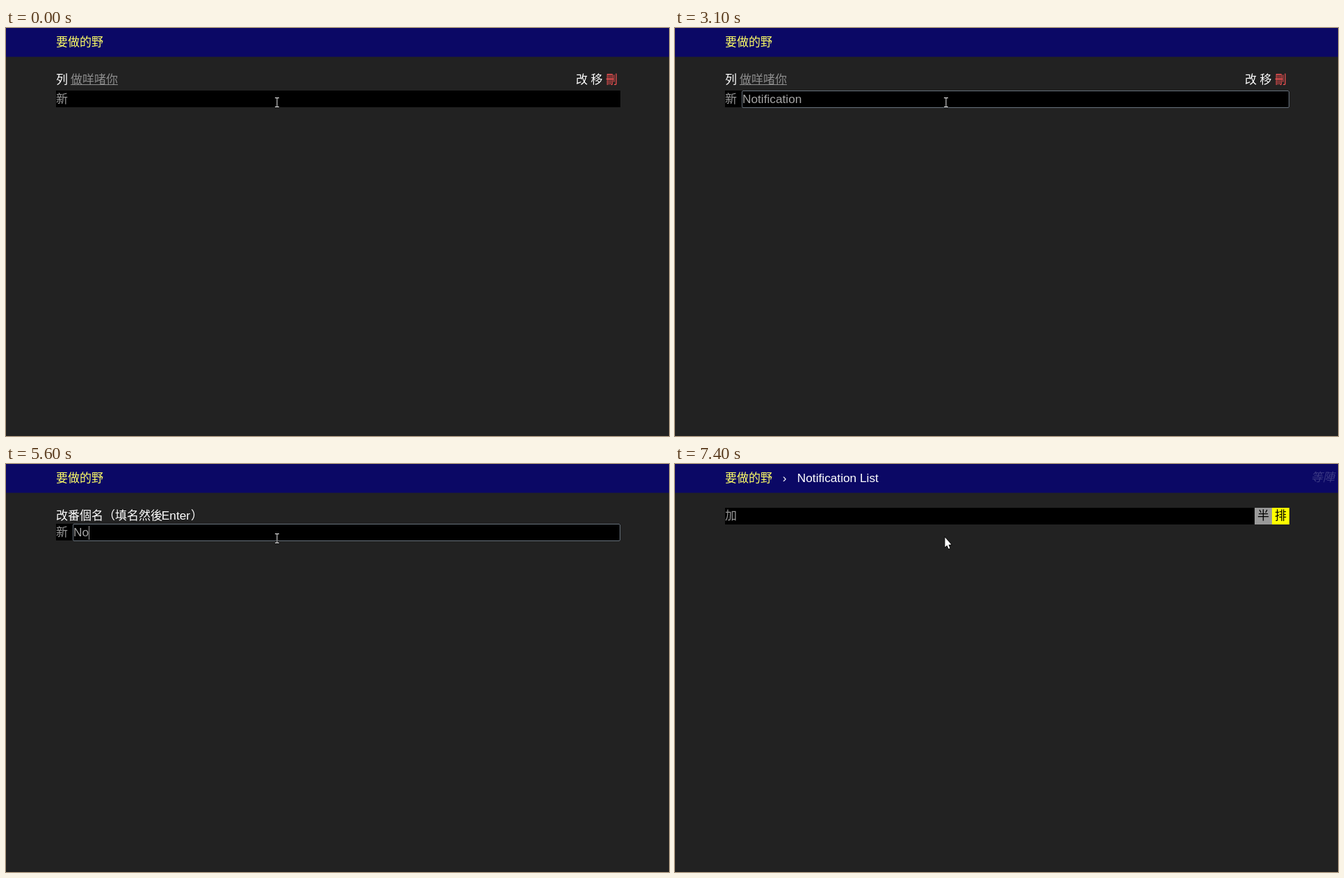
An HTML page with a canvas that plays this animation: 954x587 px, repeating every 8 s.

```html
<!DOCTYPE html>
<html lang="zh">
<head>
<meta charset="utf-8">
<title>要做的野</title>
<style>
  html, body { margin: 0; width: 100%; height: 100%; overflow: hidden; background: #222; }
  canvas { display: block; }
</style>
</head>
<body>
<canvas id="stage" width="954" height="587"></canvas>
<script>
const ctx = document.getElementById('stage').getContext('2d', { alpha: false });
const LOOP = 8000, RENAME_AT = 3300, LIST_AT = 7400;
const HAN = '17px "Noto Sans CJK SC", "Noto Sans CJK", sans-serif';
const LATIN = '17.28px "Liberation Sans", Arial, sans-serif';
const GREY = '#999', WHITE = '#fff', YELLOW = '#ffff66';
const WORD = 'Notification List';
const LEFT = 72, ROW = 80;

function rect(x, y, w, h, color) {
  ctx.fillStyle = color;
  ctx.fillRect(x, y, w, h);
}

function text(str, x, y, color, font = HAN) {
  ctx.font = font;
  ctx.fillStyle = color;
  ctx.fillText(str, x, y);
}

// Letters come in pairs every 200 ms; each third pair lags by 100 ms.
function pairsTyped(elapsed) {
  const beat = n => 200 * n + (n % 3 === 1 ? 100 : 0);
  let n = 0;
  while (beat(n + 1) <= elapsed) n++;
  return n;
}

function itemLetters(t) {
  if (t < 1000) return 0;
  return t < 3100 ? Math.min(11, 1 + 2 * pairsTyped(t - 1300)) : 12;
}

function renameLetters(t) {
  return t < 5600 ? 0 : Math.min(16, 2 + 2 * pairsTyped(t - 5600));
}

function newRow(top) {
  rect(LEFT, top, 812, 24, '#000');
  text('新', LEFT, top + 18, GREY);
}

function field(top, count, caretTop, showCaret) {
  const typed = WORD.slice(0, count), x = 97;
  ctx.beginPath();
  ctx.roundRect(x - 0.5, top + 0.5, 787, 24, 1.5);
  ctx.fillStyle = '#000';
  ctx.fill();
  ctx.strokeStyle = '#67717b';
  ctx.lineWidth = 1;
  ctx.stroke();
  text(typed, x, top + 18, '#a6a6a6', LATIN);
  if (showCaret) {
    rect(Math.round(x + ctx.measureText(typed).width), caretTop, 1, 20, GREY);
  }
}

function beam() {
  for (const [pad, color] of [[0.5, '#000'], [0, '#eee']]) {
    const bar = (x, y, w, h) => rect(x - pad, y - pad, w + 2 * pad, h + 2 * pad, color);
    bar(387, 100, 6, 1);
    bar(389.5, 101, 1, 12);
    bar(387, 113, 6, 1);
  }
}

function arrow() {
  const path = new Path2D('M388.5 105.5v14l3-2.5 2.2 5 2-.8-2.1-5 3.9-.4z');
  ctx.strokeStyle = '#000';
  ctx.lineWidth = 1.4;
  ctx.stroke(path);
  ctx.fillStyle = WHITE;
  ctx.fill(path);
}

function header() {
  rect(0, 0, 954, 587, '#222');
  rect(0, 0, 954, 41.5, '#0b0865');
  text('要做的野', LEFT, 26, YELLOW);
}

function itemPage(t) {
  text('列', LEFT, ROW, WHITE);
  text('做咩啫你', 93, ROW, '#8c8c8c');
  rect(93, 81, 68, 1, '#8c8c8c');
  text('改', 820, ROW, WHITE);
  text('移', 841.5, ROW, WHITE);
  text('刪', 863, ROW, '#ff5555');
  newRow(90);
  if (t >= 200) field(90, itemLetters(t), 92, t < 3100);
  beam();
}

function renamePage(t) {
  text('改番個名（填名然後', LEFT, ROW, WHITE);
  text('Enter', 223.8, ROW, WHITE, LATIN);
  text('）', 266, ROW, WHITE);
  newRow(86);
  if (t >= 4100) field(86, renameLetters(t), 89, true);
  beam();
}

function listPage() {
  text('›', 154.7, 26, WHITE, LATIN);
  text(WORD, 175.8, 26, WHITE, LATIN);
  text('等陣', 915, 25, '#3b3984', 'italic ' + HAN);
  rect(LEFT, 63, 762, 24, '#000');
  rect(834, 63, 25, 24, GREY);
  rect(859, 63, 25, 24, '#ff0');
  text('加', LEFT, ROW, GREY);
  text('半', 838, ROW, '#000');
  text('排', 863, ROW, '#000');
  arrow();
}

function draw(t) {
  header();
  if (t < RENAME_AT) itemPage(t);
  else if (t < LIST_AT) renamePage(t);
  else listPage();
}

const start = performance.now();
function tick() {
  draw((performance.now() - start) % LOOP);
  requestAnimationFrame(tick);
}
tick();
</script>
</body>
</html>
```
